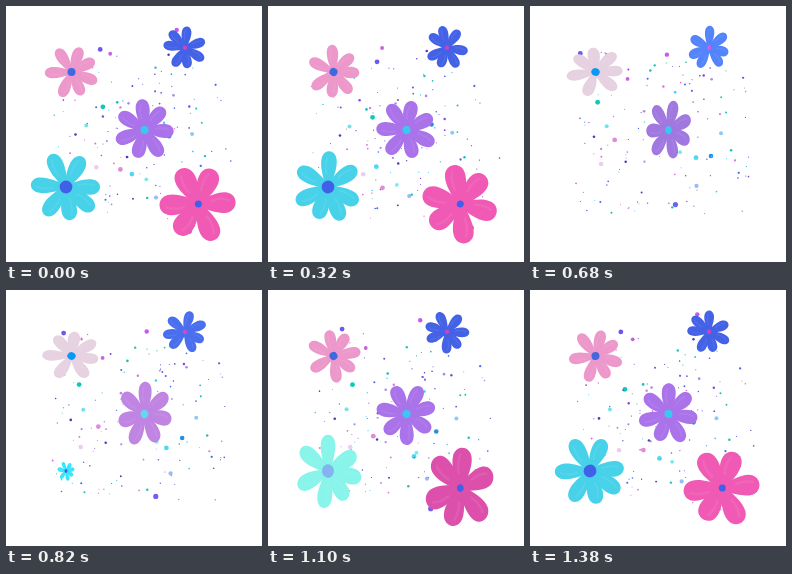
Write an HTML page with a canvas that moves like this. It is 256 by 256 pixels and loops after 1.44 s.

```html
<!DOCTYPE html>
<html>
<head>
<meta charset="utf-8">
<style>
html, body { margin: 0; width: 100%; height: 100%; overflow: hidden; background: #fff; }
canvas { display: block; width: 100vw; height: 100vh; }
</style>
</head>
<body>
<canvas id="stage" width="256" height="256"></canvas>
<script>
const ctx = document.getElementById('stage').getContext('2d');
const LOOP = 1440, RESTART = 330, TURN = 1.45;
const TAU = Math.PI * 2, RAD = Math.PI / 180;

// petals: directions in degrees at t = 0; spin: degrees per second;
// tints: popping, flashing, settled; cores: flashing, settled
const flowers = [
  { x: 179, y: 41.7, r: 22, petals: [-133, -84, -19, 33, 82, 122, -172], width: 9.2, spin: 90, start: 330,
    tints: ['#4868f0', '#5484fb', '#4462e6'], core: 2.2, cores: ['#d858e0', '#d040c0'] },
  { x: 65.5, y: 66, r: 27, petals: [-122, -70, -27, 21, 65, 113, 178], width: 10.8, spin: 90, start: 415, wide: true,
    tints: ['#e8b0e0', '#e6d2e0', '#ec98ca'], core: 4, cores: ['#0a98f8', '#4068e0'] },
  { x: 138.5, y: 124, r: 30.5, petals: [-95, -48, 3, 57, 106, 159, -147], width: 13.2, spin: -95, start: 550,
    tints: ['#a078e0', '#c084e2', '#aa73ea'], core: 4, cores: ['#60d8f0', '#38c8f0'] },
  { x: 60, y: 181, r: 35.5, petals: [-115, -61, 0, 40, 82, 127, -176], width: 14.8, spin: 85, start: 800,
    tints: ['#38e6fc', '#88f4ea', '#48d2ea'], core: 6.4, cores: ['#84b4f0', '#4060e8'] },
  { x: 192.3, y: 198, r: 39, petals: [-118, -67, -3, 66, 125, 178], width: 19.5, spin: 55, start: 820,
    tints: ['#e060c0', '#dc50ac', '#f05ab4'], core: 3.5, cores: ['#4060e8', '#4060e8'] }
];

function seeded(seed) {
  return () => (seed = (seed * 16807) % 2147483647) / 2147483647;
}

function makeDots() {
  const rnd = seeded(4127);
  const dot = (x, y, heading, speed, r, color, turn = TURN) =>
    ({ x, y, heading: heading * RAD, speed, r, color, turn });
  const dots = [
    dot(60, 101, -41, 41, 2.4, '#10c8b8'),
    dot(41, 57, -55, 61, 2.4, '#6c58ec'),
    dot(134, 61, -86, 58, 2.2, '#c858f0'),
    dot(142, 185, 85, 64, 2.6, '#7060f0', -TURN),
    dot(172, 140, 108, 60, 2.4, '#50d8f0'),
    dot(189, 151, 178, 37, 2.3, '#2090e8'),
    dot(72, 133, -5, 58, 2.4, '#e08cd8'),
    dot(66, 161, -40, 27, 2.3, '#eccdf0'),
    dot(76, 121, -60, 5, 2, '#70e4ee'),
    dot(192, 126, 120, 7, 2, '#90c8f4'),
    dot(101, 80, -125, 36, 1.9, '#c860e0'),
    dot(168, 174, 95, 28, 2.1, '#98bcf6'),
    dot(147, 138, 60, 40, 1.9, '#78eaf0')
  ];
  const colors = ['#8048e0', '#4868f0', '#48c8f0', '#18c0b8', '#e070d8', '#b088f0', '#5038b8'];
  for (let i = 0; i < 120; i++) {
    const x = 42 + rnd() * 182, y = 44 + rnd() * 168;
    const inward = Math.atan2(122 - y, 136 - x) / RAD;
    dots.push(dot(x, y, inward - 50 + (rnd() - 0.5) * 190, 8 + rnd() * 48,
      0.5 + 0.9 * rnd() ** 2, colors[Math.floor(rnd() * colors.length)]));
  }
  return dots;
}
const dots = makeDots();

const mix = (a, b, k) => a + (b - a) * k;

function blend(from, to, k) {
  const channel = i => Math.round(mix(parseInt(from.substr(i, 2), 16), parseInt(to.substr(i, 2), 16), k));
  return `rgb(${channel(1)},${channel(3)},${channel(5)})`;
}

const progress = (a, b, t) => Math.min(1, Math.max(0, (t - a) / (b - a)));

function track(keys, t) {
  for (let i = 1; i < keys.length; i++) {
    if (t < keys[i][0]) return mix(keys[i - 1][1], keys[i][1], progress(keys[i - 1][0], keys[i][0], t));
  }
  return keys[keys.length - 1][1];
}

const narrowKeys = [[0, 0], [45, 0.54], [135, 0.79], [270, 0.93], [450, 1]];
const tallKeys = [[0, 0], [45, 0.64], [135, 1.02], [270, 1.07], [450, 1]];

function disc(x, y, r, color) {
  ctx.fillStyle = color;
  ctx.beginPath();
  ctx.arc(x, y, r, 0, TAU);
  ctx.fill();
}

function petal(length, width, color) {
  const h = width * 0.6;
  ctx.fillStyle = color;
  ctx.beginPath();
  ctx.moveTo(0, -width * 0.16);
  ctx.bezierCurveTo(length * 0.3, -h * 0.6, length * 0.55, -h, length * 0.78, -h * 0.85);
  ctx.bezierCurveTo(length * 1.07, -h * 0.65, length * 1.07, h * 0.65, length * 0.78, h * 0.85);
  ctx.bezierCurveTo(length * 0.55, h, length * 0.3, h * 0.6, 0, width * 0.16);
  ctx.fill();
  // soft crease
  ctx.strokeStyle = 'rgba(255,255,255,0.07)';
  ctx.lineWidth = width * 0.13;
  ctx.beginPath();
  ctx.moveTo(length * 0.35, -width * 0.12);
  ctx.quadraticCurveTo(length * 0.6, -width * 0.3, length * 0.85, -width * 0.1);
  ctx.stroke();
}

function drawFlower(f, clock) {
  const age = clock - f.start;
  if (age <= 0) return;
  const flash = progress(135, 270, age), settled = progress(410, 540, age);
  const color = age < 270
    ? blend(f.tints[0], f.tints[1], flash)
    : blend(f.tints[1], f.tints[2], settled);

  ctx.save();
  ctx.translate(f.x, f.y);
  if (f.wide && age > 135) ctx.scale(mix(1.07, 1, settled), mix(0.94, 1, settled));
  else ctx.scale(track(narrowKeys, age), track(tallKeys, age));
  ctx.rotate(f.spin * RAD * (clock - LOOP) / 1000);
  f.petals.forEach((direction, i) => {
    ctx.save();
    ctx.rotate(direction * RAD);
    petal(f.r * (0.98 + 0.04 * Math.sin(i * 2.4 + 1)), f.width, color);
    ctx.restore();
  });
  disc(0, 0, f.r * 0.24, color);
  disc(0, 0, f.core, blend(f.cores[1], f.cores[0], flash * (1 - settled)));
  ctx.restore();
}

function drawDot(d, seconds) {
  const end = d.heading + d.turn * seconds, reach = d.speed / d.turn;
  const x = d.x + reach * (Math.sin(end) - Math.sin(d.heading));
  const y = d.y - reach * (Math.cos(end) - Math.cos(d.heading));
  disc(x, y, d.r, d.color);
}

function draw(ms) {
  const t = ms % LOOP;
  const clock = t < RESTART ? t + LOOP : t;
  ctx.fillStyle = '#fff';
  ctx.fillRect(0, 0, 256, 256);
  dots.forEach(d => drawDot(d, (clock - 460) / 1000));
  flowers.forEach(f => drawFlower(f, clock));
}

let origin;
function tick(now) {
  if (origin === undefined) origin = now;
  draw(now - origin);
  requestAnimationFrame(tick);
}
draw(0);
requestAnimationFrame(tick);
</script>
</body>
</html>
```
